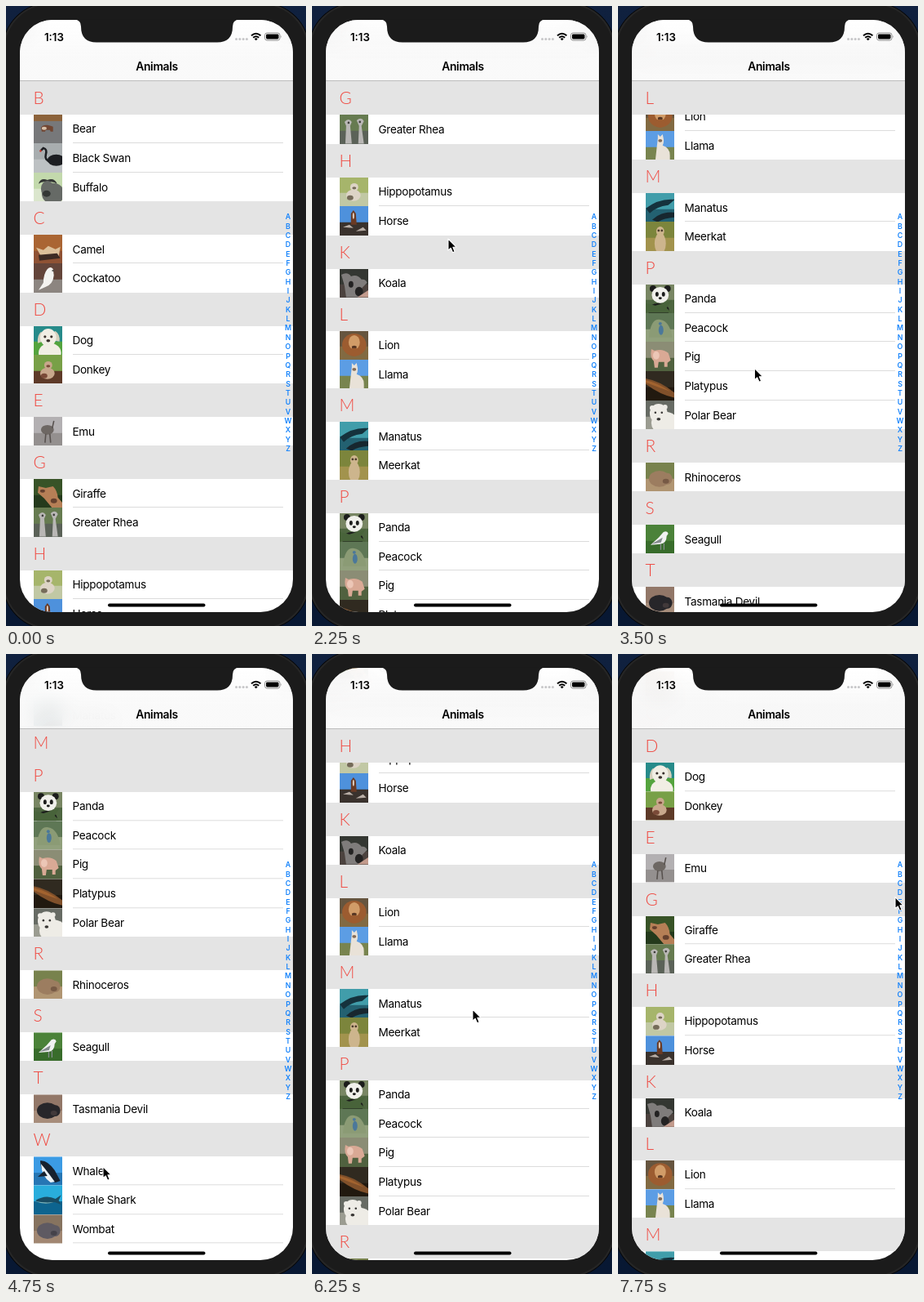
An HTML page that plays this animation: 368x759 px, repeating every 8 s.

```html
<!DOCTYPE html>
<html lang="en">
<head>
<meta charset="utf-8">
<title>Animals</title>
<style>
html, body { margin: 0; width: 100%; height: 100%; overflow: hidden; background: #0a1730; }
#stage { position: relative; width: 368px; height: 759px; overflow: hidden; font-family: Inter, Roboto, sans-serif; color: #000;
  background: linear-gradient(#10213f, #081630 50%, #081833); }
#stage div, #stage svg { position: absolute; }
#body { left: -4px; top: -4px; width: 376px; height: 767px; border-radius: 59px; background: #1b1b1b; box-shadow: 0 0 0 1px #050608, inset 0 0 0 2px #262626; }
#screen { left: 17px; top: 17px; width: 335px; height: 725px; border-radius: 40px; overflow: hidden; background: #fff; }
#list { left: 0; top: 75px; width: 100%; }
.row { left: 0; width: 100%; height: 35.6px; line-height: 36.6px; font-size: 13.6px; letter-spacing: -.3px; white-space: nowrap; }
.row svg { left: 16.500px; top: 0; width: 35.6px; height: 35.6px; }
.row span { position: absolute; left: 64.5px; }
.row.line::after { content: ""; position: absolute; left: 64.5px; right: 12px; bottom: 0; height: 1px; background: #dcdcdc; }
.head { left: 0; width: 100%; height: 41px; text-indent: 16.500px; background: #e4e4e4; color: #ef4a42; font: 300 20.8px/39px Lato, sans-serif; }
#nav { left: 0; top: 0; width: 100%; height: 75px; background: linear-gradient(rgba(255,255,255,.94), rgba(249,249,249,.9) 60%);
  backdrop-filter: blur(12px) grayscale(.6); border-bottom: 1px solid #bcbcbc; box-sizing: border-box; }
#title { left: 0; width: 100%; top: 47px; text-align: center; text-indent: 1px; font-weight: 600; font-size: 13.9px; line-height: 20px; letter-spacing: -.32px; }
#clock { left: 30px; top: 10.5px; font-weight: 600; font-size: 13.3px; line-height: 20px; }
#index div { left: 320px; width: 18px; text-align: center; font-weight: 600; font-size: 8.8px; line-height: 11.35px; color: #1583fb; }
#over { left: 0; top: 0; }
</style>
</head>
<body>
<div id="stage">
  <div id="body"></div>
  <div id="screen">
    <div id="list"></div>
    <div id="nav"></div>
    <div id="title">Animals</div>
    <div id="clock">1:13</div>
    <div id="index"></div>
  </div>
  <svg id="over" width="368" height="759" viewBox="0 0 368 759">
    <path fill="#1b1b1b" d="M84 16.500q8 .5 8 8.500q0 19.500 19 19.500h148q19 0 19-19.500q0-8 8-8.500z"/>
    <g fill="#c6c6c8"><circle cx="282.500" cy="40.500" r="1.500"/><circle cx="286.800" cy="40.500" r="1.500"/><circle cx="291.100" cy="40.500" r="1.500"/><circle cx="295.400" cy="40.500" r="1.500"/></g>
    <g fill="none" stroke="#000" stroke-width="2">
      <path d="M301 36.300q5.700-5 11.400 0"/><path d="M303.200 38.700q3.500-3 7 0"/>
    </g>
    <path d="M304.700 40.200q2-1.700 4 0l-2 2.100z"/>
    <rect x="317.500" y="33" width="18.500" height="9" rx="2.700" fill="none" stroke="#8c8c8c"/>
    <rect x="319" y="34.500" width="15.500" height="6" rx="1.400"/>
    <path d="M337.200 36q1.300 1.500 0 3z" fill="#8c8c8c"/>
    <rect x="125" y="731.500" width="119.500" height="4" rx="2"/>
    <path id="arrow" d="M0 0V14.200L3.200 11.300L5.600 16.800L8.200 15.700L5.900 10.300H10.200Z" stroke="#fff" stroke-width="1.100" stroke-linejoin="round"/>
  </svg>
</div>
<script>
const HEAD = 40.4, ROW = 35.6, LOOP = 8000, TICK = 250;
const $ = id => document.getElementById(id);
const path = (c, d) => `<path fill="${c}" d="${d}"/>`;
const dot = (c, x, y, rx, ry = rx) => `<ellipse fill="${c}" cx="${x}" cy="${y}" rx="${rx}" ry="${ry}"/>`;

// Simple silhouettes in a 36-unit square: a = main tone, b = accent
const poses = {
  small: (a, b) => path(a, "M9 17q3-4 8-3t7 2v6h-3l-1-2h-5l-1 2h-4z") + dot(b, 13, 18, 3, 2),
  stand: (a, b) => path(a, "M7 9l4 2q10-3 17 3l3 9-4 3v5h-4v-6h-7l-1 7h-4l-1-8q-5-4-3-15z") + dot(b, 13, 17, 4, 5),
  puppy: (a, b) => dot(a, 20, 34, 14, 12) + path("#d6d0bd", "M9 8q-5 4-4 14l6-2 2-11zM27 7q6 4 5 13l-6-1-3-10z") + dot(a, 18, 15, 10, 11)
    + dot(b, 14, 14, 1.6) + dot(b, 22, 14, 1.6) + dot(b, 18, 19, 2.4, 1.8),
  panda: (a, b) => dot(b, 16, 33, 13, 9) + dot(b, 9, 6, 4) + dot(b, 27, 6, 4) + dot(a, 18, 14, 10.5, 10)
    + dot(b, 14, 13, 2, 3) + dot(b, 22, 13, 2, 3) + dot(b, 18, 18, 2, 1.5) + path("#48633a", "M0 24l12 3 20-6-6 9 6 6H0z"),
  polar: (a, b) => dot(a, 24, 28, 17, 14) + dot(a, 8, 9, 3) + dot(a, 24, 8, 3) + dot(a, 16, 16, 11, 12)
    + dot(b, 12, 15, 1.3) + dot(b, 20, 15, 1.3) + dot(b, 16, 23, 2.4, 1.8),
  horns: (a, b) => dot(a, 24, 26, 14, 13) + path(b, "M6 14q2-8 11-5 9-3 12 5-5-4-12-2-7-2-11 2z") + dot(a, 17, 20, 8, 10) + dot(b, 16, 26, 5, 4),
  koala: (a, b) => path(a, "M2 8q8-4 12 2 8-3 13 4 5-1 7 4l-6 6-3 12H8l-2-14z") + dot(b, 14, 20, 3, 4) + dot(b, 24, 29, 5, 6)
    + path("#c39b8d", "M22 36l14-9v9z"),
  mane: (a, b) => dot(a, 18, 18, 15, 14) + dot(b, 18, 15, 7, 9) + dot("#563623", 18, 21, 3, 2) + dot(a, 18, 27, 7, 5),
  swan: (a, b) => dot(a, 28, 21, 11, 7) + `<path fill="none" stroke="${a}" stroke-width="2.600" d="M21 23q-8-2-6-9t-3-8l-3 3"/>` + dot(b, 8.5, 9.5, 1.3),
  bird: (a, b) => path(a, "M17 7q4-4 7 0l1 8q-1 11-10 14l-9 4 6-9q0-11 5-17z") + dot(b, 24, 9, 1.5, 1),
  gull: (a, b) => path(a, "M22 9q5-2 6 2l-2 3q0 9-8 10L6 25l10-9z") + path(b, "M7 24l14-8-2 6zM18 24h1.300v7H18zM22 23h1.300v8H22z"),
  horse: (a, b) => path(a, "M14 9l3-4 3 4 1 14h-7z") + dot(b, 17, 12, 1, 4) + path("#b9aea6", "M4 26l8-3 5 4zM20 31l9-5 4 4z"),
  llama: (a, b) => path(a, "M15 9V4l3 3 3-3 1 5q1 5-1 9 9 3 9 12v6H12l2-18z") + dot(b, 18, 12, 2.5, 2),
  emu: (a, b) => dot(a, 17, 16, 8, 6) + `<path fill="none" stroke="${b}" stroke-width="1.600" d="M23 14l2-9M15 21l-1 11M20 21l1 11"/>`,
  heads: (a, b) => path(a, "M6 9q5-6 9 0l-2 5 2 22H7l1-22zM21 7q6-5 9 1l-3 6 3 22h-7l1-22z") + dot(b, 11, 10, 1.3) + dot(b, 25, 9, 1.3),
  giraffe: (a, b) => path(a, "M6 9l9 2 9-2q5 5 6 14l6 7v6H23L13 24 5 17z") + dot(b, 11, 15, 3, 2) + dot(b, 25, 27, 4, 3),
  sit: (a, b) => dot(a, 17, 23, 9, 7) + dot(a, 18, 13, 5) + dot(b, 18, 14, 2.5, 1.6) + dot(b, 13, 26, 4, 3),
  lie: (a, b) => path(a, "M3 16l9 3 6-5 9 4 6-3-2 12-20 3z") + path(b, "M6 25l23-2 4 6-26 3z"),
  up: (a, b) => dot(a, 18, 27, 7, 13) + dot(a, 18, 12, 5, 6) + dot(b, 16, 11, 1.4) + dot(b, 20, 11, 1.4),
  round: (a, b) => dot(a, 17, 20, 13, 10) + dot(a, 27, 20, 6, 7) + dot(b, 25, 23, 4, 3),
  swim: (a, b) => path(a, "M0 19q17-13 36-11l-8 7q-15 2-23 10z") + path(b, "M8 33q12-11 28-9v6q-14 1-21 6z"),
  leap: (a, b) => path(a, "M8 5q9-1 18 12l7 13-6 2Q10 28 8 5z") + path(b, "M9 9q7 8 17 22l-5 1Q10 25 9 9z") + path(a, "M13 18l-8 7 12-1z"),
  shark: (a, b) => path(a, "M2 19q13-8 25-2l7-5-3 7 3 5-8-3q-13 4-24-2z") + path(b, "M2 20q11 2 23 1-11 4-23-1z"),
  bask: (a, b) => path(a, "M0 9q18 3 36 18v6Q19 30 0 16z") + path(b, "M0 11q17 4 30 14Q15 20 0 14z"),
  plume: (a, b) => path(b, "M4 30Q6 6 18 8t15 22z") + dot(a, 19, 21, 3, 6) + dot(a, 18, 13, 2)
};

// name, upper tone, lower tone, pose, main, accent
const animals = `
Bear|#8c633b|#77787a|small|#714632|#d8c1a8
Black Swan|#a8adaf|#bdc1c3|swan|#1d1e22|#c03c30
Buffalo|#c3d9ac|#dbe6cd|horns|#666a66|#343735
Camel|#aa6533|#8f5234|lie|#dcc09a|#3d2b24
Cockatoo|#64453a|#8c8580|bird|#f4f3f0|#57534f
Dog|#278b8a|#54a43e|puppy|#f1eee4|#39302b
Donkey|#78a047|#5e3a28|sit|#c8a78c|#7a4a38
Emu|#b3b0b2|#94908f|emu|#6d6763|#57514e
Giraffe|#385327|#243a1c|giraffe|#b67f56|#65402e
Greater Rhea|#667b50|#5b6258|heads|#b9b7b5|#3c3b39
Hippopotamus|#a6b56b|#c1c8a4|sit|#ddd4c6|#756b59
Horse|#4e91dc|#3a322d|horse|#6a3a24|#e2d6cb
Koala|#343732|#4b423e|koala|#7f7c7b|#232222
Lion|#66553f|#826a42|mane|#9c5c30|#d19c68
Llama|#5c9de4|#78844f|llama|#e9e2d8|#846c58
Manatus|#419daa|#236171|swim|#15323d|#17272f
Meerkat|#7c853c|#a2934d|up|#cdb58d|#4d3d2d
Panda|#788663|#4e6640|panda|#f0f0eb|#1b1c1b
Peacock|#5e7755|#91a07c|plume|#4b789a|#8b9b75
Pig|#8b8d75|#50613f|stand|#d9a995|#ecc6b6
Platypus|#302a20|#21190f|bask|#80502a|#a2632f
Polar Bear|#676b64|#9b9c91|polar|#eeece6|#373533
Rhinoceros|#78824d|#b09572|round|#9c7d60|#775a45
Seagull|#4b8239|#386c2b|gull|#f1f2f1|#858c8e
Tasmania Devil|#927768|#a78d7b|round|#27262a|#41393a
Whale|#3b9be4|#2676b4|leap|#17212e|#edf3f7
Whale Shark|#29addc|#0d648f|shark|#194c63|#7bb5bd
Wombat|#86735f|#a18772|round|#5e5a62|#45424a`.trim().split("\n").map(l => l.split("|"));

const list = $("list"), heads = [];
const add = (cls, y, html, parent = list) => {
  const el = document.createElement("div");
  el.className = cls;
  el.style.top = y + "px";
  el.innerHTML = html;
  parent.append(el);
  return el;
};

const rows = add("", 0, "");
rows.style.width = "100%";
let end = 0, letter = "";
animals.forEach(([name, top, low, pose, a, b], i) => {
  if (name[0] !== letter) {
    letter = name[0];
    heads.push({ y: end, letter });
    end += HEAD;
  }
  const next = animals[i + 1];
  const line = !next || next[0][0] === letter ? " line" : "";
  const split = pose === "small" ? 9 : 20;
  const art = `<svg viewBox="0 0 36 36"><rect width="36" height="36" fill="${top}"/>`
    + `<rect y="${split}" width="36" height="36" fill="${low}"/>${poses[pose](a, b)}</svg>`;
  add("row" + line, end, `${art}<span>${name}</span>`, rows);
  end += ROW;
});
heads.forEach(h => h.el = add("head", 0, h.letter));

[..."ABCDEFGHIJKLMNOPQRSTUVWXYZ"].forEach((c, i) => add("", 235.4 + i * 11.34, c, $("index")));

// time, scroll, pointer x, pointer y
const moves = [
  [750, 12, 176, 590], [1000, 40, 173, 555], [1750, 273.3, 166.5, 317.5],
  [2000, 372, 166, 240], [2500, 590, 168, 330], [3000, 678.7, 170, 525.5],
  [3250, 692, 170, 512], [3750, 830, 165, 375], [4250, 925, 128, 560],
  [4500, 932.7, 120, 622], [4750, 932.7, 119, 627.5], [5250, 941, 140, 430],
  [5750, 939.6, 172, 242], [6000, 830, 174, 350], [6500, 330, 220, 520],
  [6750, 80, 285, 430], [7000, -6.5, 337, 335.5], [7250, 0, 340, 272],
  [7500, 147.2, 340, 284], [7750, 258.8, 340, 297.5]
];

function stateAt(t) {
  const k = moves.findIndex(m => m[0] >= t);
  const q = moves[k], p = moves[Math.max(0, k - 1)];
  const u = q === p ? 0 : (t - p[0]) / (q[0] - p[0]);
  return p.map((v, i) => v + (q[i] - v) * u);
}

function draw(ms) {
  const t = Math.floor(ms % LOOP / TICK) * TICK;
  const active = t >= moves[0][0];
  const [, scroll, x, y] = active ? stateAt(t) : [0, 0, 0, 0];
  rows.style.transform = `translateY(${-scroll}px)`;
  heads.forEach((h, i) => {
    const next = i + 1 < heads.length ? heads[i + 1].y : end;
    const pos = Math.max(h.y, Math.min(scroll, next - HEAD));
    h.el.style.transform = `translateY(${Math.round(pos - scroll)}px)`;
  });
  const arrow = $("arrow");
  arrow.setAttribute("transform", `translate(${x} ${y})`);
  arrow.style.display = active ? "" : "none";
}

const start = performance.now();
function loop() {
  draw(performance.now() - start);
  requestAnimationFrame(loop);
}
loop();
</script>
</body>
</html>
```
